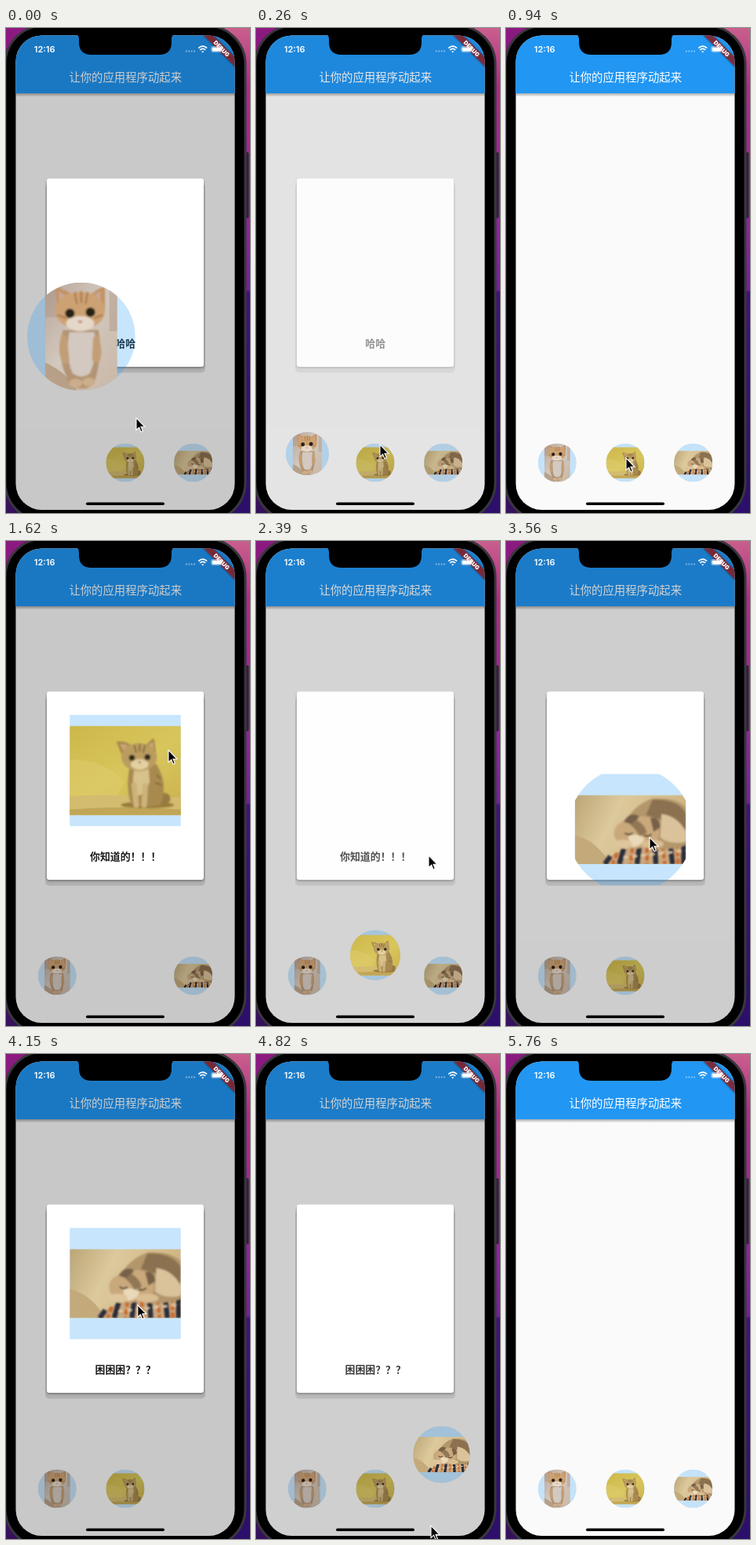
Animation, 311 px wide and 617 px high, one loop 5.86 s. Source, as an HTML page:

```html
<!DOCTYPE html>
<html lang="zh-CN">
<head>
<meta charset="utf-8">
<title>让你的应用程序动起来</title>
<style>
  html, body { margin: 0; width: 100%; height: 100%; overflow: hidden; background: #000; }
  svg { display: block; }
  text { font-family: "Noto Sans CJK SC", "Noto Sans CJK", sans-serif; }
  .latin { font-family: Inter, sans-serif; fill: #fff; }
</style>
</head>
<body>
<svg width="311" height="617" viewBox="0 0 311 617">
  <defs>
    <linearGradient id="wallRight" x2="0" y2="1">
      <stop offset="0" stop-color="#c85f8c"/><stop offset=".12" stop-color="#ae2d86"/>
      <stop offset=".4" stop-color="#8f279a"/><stop offset=".54" stop-color="#74219a"/>
      <stop offset=".545" stop-color="#42127c"/><stop offset="1" stop-color="#2b0f6a"/>
    </linearGradient>
    <linearGradient id="wallLeft" x2="0" y2="1">
      <stop offset="0" stop-color="#8c1a80"/><stop offset="1" stop-color="#35115c"/>
    </linearGradient>
    <linearGradient id="barShadow" x2="0" y2="1">
      <stop offset="0" stop-opacity=".32"/><stop offset="1" stop-opacity=".04"/>
    </linearGradient>
    <linearGradient id="wall" x2="1" y2="1">
      <stop offset="0" stop-color="#b7a397"/><stop offset=".45" stop-color="#d2c8be"/><stop offset="1" stop-color="#c9b7a6"/>
    </linearGradient>
    <linearGradient id="studio" x2=".8" y2="1">
      <stop offset="0" stop-color="#cdb74a"/><stop offset=".55" stop-color="#d8c65c"/><stop offset="1" stop-color="#cdb452"/>
    </linearGradient>
    <linearGradient id="room" x2="1" y2=".3">
      <stop offset="0" stop-color="#bba576"/><stop offset=".4" stop-color="#dcc99c"/><stop offset="1" stop-color="#cfb480"/>
    </linearGradient>
    <clipPath id="screenClip"><rect x="12.500" y="9.500" width="279" height="603.500" rx="33"/></clipPath>
    <clipPath id="roomClip"><rect x="-50" y="-31" width="100" height="62"/></clipPath>
    <filter id="soft" x="-20%" y="-50%" width="140%" height="200%"><feGaussianBlur stdDeviation="1.2"/></filter>
    <filter id="photoSoft"><feGaussianBlur stdDeviation=".6"/></filter>

    <!-- Photos live in a 100-unit square centred on the origin -->
    <g id="photo0">
      <rect x="-33.3" y="-50" width="66.6" height="100" fill="url(#wall)"/>
      <path d="M-33.3-50h15v32h-15zM26-50h7.3v45H26z" fill="#a8917f" opacity=".4"/>
      <path d="M-33.3 24Q-12 34-4 50h-29.3z" fill="#b8a088"/>
      <g filter="url(#photoSoft)">
        <path d="M-17-6Q-22 20-14 36-12 48-2 48 8 49 12 43 20 18 16-6z" fill="#b39473"/>
        <path d="M-11-4Q-15 18-8 34 0 40 8 34 16 16 12-4z" fill="#d3c9c0"/>
        <path d="M-18-3Q-23 13-17 25-12 27-11 22L-13 1zM15-2Q21 12 17 23 12 26 10 21L11 1z" fill="#c39d75"/>
        <path d="M-22-25L-24-45Q-15-44-9-39 0-42 9-39 16-45 22-46L22-23z" fill="#c39364"/>
        <path d="M-20-30L-21-41Q-16-40-12-36zM18-31L18-42Q14-41 10-36z" fill="#c9a594"/>
        <ellipse cx="-1" cy="-24" rx="23" ry="17.5" fill="#cda273"/>
        <path d="M-6-41l2 11M0-42v11M6-41l-2 11M-22-20l8 3M20-20l-8 3" stroke="#aa7b4b" stroke-width="1.6"/>
        <ellipse cx="-1" cy="-12" rx="13" ry="7" fill="#e5d8c9"/>
        <circle cx="-10.5" cy="-21.5" r="4.4" fill="#272019"/><circle cx="8.5" cy="-22.5" r="4.4" fill="#272019"/>
        <path d="M-3.5-14.500h5L-1-12z" fill="#b8766b"/>
        <ellipse cx="-5" cy="43" rx="6" ry="4" fill="#ccae8d"/><ellipse cx="7" cy="42" rx="6" ry="4" fill="#ccae8d"/>
      </g>
    </g>

    <g id="photo1">
      <rect x="-50" y="-40" width="100" height="80" fill="url(#studio)"/>
      <path d="M-50-10Q-20-10 0 10L-10 28H-50z" fill="#dfcd70" opacity=".5"/>
      <path d="M-50 23Q0 21 50 24V40H-50z" fill="#d3bb70"/>
      <path d="M-50 35Q0 31 50 35V40H-50z" fill="#c2a657"/>
      <g filter="url(#photoSoft)">
        <ellipse cx="20" cy="31" rx="24" ry="3" fill="#977a3a"/>
        <path d="M30 20Q43 19 40 28 34 33 28 30z" fill="#987a40"/>
        <path d="M4-4Q0 18 6 31 19 34 32 31 39 12 28-6z" fill="#a88a50"/>
        <path d="M8 0Q5 12 10 23 18 22 22 10L21-2z" fill="#d8c28c"/>
        <path d="M-3-14L-8-26Q1-27 6-22 13-25 19-23 23-28 26-29L28-14z" fill="#a78848"/>
        <path d="M-2-18L-5-24Q1-24 4-21zM26-18L25-26Q22-25 20-21z" fill="#c9a476"/>
        <ellipse cx="12.5" cy="-12" rx="16" ry="12.5" fill="#ba9c60"/>
        <path d="M8-23l2 7M13-24v7M18-23l-2 7M28 4l4 3M27 11l6 2" stroke="#84672f" stroke-width="1.3"/>
        <ellipse cx="13" cy="-5.5" rx="8" ry="4.8" fill="#e2d0a2"/>
        <circle cx="6" cy="-11.5" r="2.7" fill="#32291a"/><circle cx="20" cy="-12" r="2.7" fill="#32291a"/>
        <path d="M11.500-8h3L13-6z" fill="#a0624c"/>
        <path d="M8 13l2 18M18 14l-1 17" stroke="#cdb37a" stroke-width="5" stroke-linecap="round"/>
      </g>
    </g>

    <g id="photo2" clip-path="url(#roomClip)">
      <rect x="-50" y="-31" width="100" height="62" fill="url(#room)"/>
      <path d="M-50 5Q-30 10-18 31H-50z" fill="#c4aa7b"/>
      <path d="M-28 31Q-10 16 10 15L50 8V31z" fill="#c9a981"/>
      <g filter="url(#photoSoft)">
        <path d="M-18 24l-5 7M-6 17l-4 14M8 16l-2 15M22 15l1 16M36 13l2 18M48 10v21" stroke="#292d3b" stroke-width="4.5"/>
        <path d="M-12 21l-4 10M2 16l-2 15M15 16v15M29 14l2 17M42 12l1 19" stroke="#c96a2e" stroke-width="3.2" stroke-dasharray="5 2"/>
        <path d="M-6 25L50 19" stroke="#ecd7b5" stroke-width="1.4" stroke-dasharray="4 4"/>
        <path d="M-5-6Q3-22 20-28 42-29 50-20V14Q30 20 13 16z" fill="#b3966b"/>
        <path d="M20-27Q42-28 50-15V0Q33-8 14-13z" fill="#8b7150"/>
        <path d="M28-14Q43-12 50 2V11Q35 14 27 7z" fill="#dac39b"/>
        <path d="M-14 7Q-17-3-6-8 1-17 8-12 19-13 24-5 29 6 21 13 4 20-9 15z" fill="#c9a97c"/>
        <path d="M-6-7Q0-17 8-12L3-4zM18-10Q26-13 27-2L21 2z" fill="#776048"/>
        <path d="M5-9Q13-5 15 3L8 6Q5-1 0-4z" fill="#927757"/>
        <path d="M-2 6Q5 2 13 8 9 17 0 15z" fill="#ead9b8"/>
        <path d="M-5 3q4 3 7 0M12 5q4 2 7-1" fill="none" stroke="#3e3023" stroke-width="1.3"/>
        <ellipse cx="-7" cy="13" rx="9" ry="4" fill="#dec59c"/><ellipse cx="20" cy="13" rx="10" ry="4" fill="#d9be92"/>
      </g>
    </g>
  </defs>

  <rect width="160" height="617" fill="url(#wallLeft)"/>
  <rect x="160" width="151" height="617" fill="url(#wallRight)"/>
  <rect x="305" y="158" width="4.5" height="84" rx="2" fill="#2c2435"/>
  <rect x="-1" y="-3" width="306" height="630" rx="49" fill="#000" stroke="#39373d" stroke-width="3"/>

  <g clip-path="url(#screenClip)">
    <rect x="12" y="9" width="280" height="604" fill="#fafafa"/>
    <rect x="12" y="83" width="280" height="4" fill="url(#barShadow)"/>
    <rect x="12" y="9" width="280" height="74" fill="#2196f3"/>
    <text x="152.2" y="68" font-size="14.36" text-anchor="middle" fill="#fff">让你的应用程序动起来</text>
    <g id="thumbs"></g>
    <g id="page">
      <rect x="12" y="9" width="280" height="604" fill-opacity=".2"/>
      <rect x="50" y="198" width="204" height="240.500" rx="5" fill-opacity=".12"/>
      <rect x="51.500" y="193" width="201" height="240" rx="4" fill-opacity=".28" filter="url(#soft)"/>
      <rect x="52" y="191.500" width="200" height="239.500" rx="3" fill="#fff"/>
      <text id="caption" x="152.2" y="406" font-size="12.92" font-weight="700" text-anchor="middle" fill="#1c1c1c"></text>
    </g>
    <g id="flight"></g>
    <g transform="translate(292 9) rotate(45)">
      <rect x="-30" y="20.1" width="60" height="8.6" fill-opacity=".5" filter="url(#soft)"/>
      <rect x="-30" y="20.1" width="60" height="8.6" fill="#b71c1c" fill-opacity=".63"/>
      <text class="latin" y="27" font-size="7.3" font-weight="900" text-anchor="middle">DEBUG</text>
    </g>
    <text class="latin" x="35.8" y="31" font-size="11" font-weight="600">12:16</text>
    <path d="M229 29.500h12" stroke="#fff" stroke-opacity=".45" stroke-width="1.8" stroke-dasharray="1.8 1.6"/>
    <g fill="none" stroke="#fff" stroke-width="1.7">
      <path d="M245.300 25.600Q250.700 20.800 256.100 25.600M247.200 27.800Q250.700 24.800 254.200 27.800"/>
      <path d="M249 29.400h3.400L250.700 31.400z" fill="#fff" stroke="none"/>
    </g>
    <rect x="261.500" y="23.500" width="14.500" height="7.2" rx="2.2" fill="none" stroke="#fff" stroke-opacity=".5" stroke-width=".8"/>
    <rect x="262.600" y="24.500" width="12.300" height="5.2" rx="1.3" fill="#fff"/>
    <rect x="102" y="603.500" width="100" height="3.6" rx="1.8"/>
  </g>
  <path d="M89 8Q93 9 93 14V18Q93 34 109 34H195Q211 34 211 18V14Q211 9 215 8z"/>
  <path id="cursor" d="M0 0V15.500L3.600 12.200 6 17.800 8.400 16.800 6 11.300H11z" stroke="#fff" stroke-width="1.1"/>
</svg>

<script>
const LOOP = 5860, FLIGHT = 600;
const SMALL = 24.5, LARGE = 100, PHOTO = LARGE * Math.SQRT2;
const CARD = [152, 292];
const HOMES = [[65.3, 553], [152, 553], [238.6, 553]];
const VISITS = [
  { pet: 0, open: -2000, close: -190, caption: '哈哈' },
  { pet: 1, open: 1000, close: 2010, caption: '你知道的！！！' },
  { pet: 2, open: 3280, close: 4482, caption: '困困困？？？' }
];
// Cursor keys: time, x, y
const CURSOR = [
  [0, 166, 496], [260, 158, 530], [560, 153, 547], [1240, 153, 547], [1410, 178, 410],
  [1620, 207, 266], [2180, 207, 267], [2390, 220, 400], [2690, 241, 562], [2780, 243, 570],
  [3285, 243, 570], [3560, 183, 377], [3920, 166, 322], [4380, 170, 316],
  [4610, 224, 588], [4820, 223, 600], [4940, 222, 609], [5050, 222, 640]
];

const spread = (from, to, count) =>
  Array.from({ length: count }, (_, i) => from + (to - from) * i / (count - 1));
const TICKS = [
  0, 80, 260, 410, 560, 940, 1030, 1135, 1240, 1410, 1620, ...spread(1680, 1760, 4),
  2000, 2090, 2180, 2390, 2690, 2780, ...spread(2900, 3230, 9), 3320, 3410, 3560, 3680,
  ...spread(3920, 4380, 12), 4610, 4820, 4940, 5050, 5260, 5760
];

const $ = id => document.getElementById(id);
const clamp = v => Math.min(1, Math.max(0, v));
const mix = (a, b, k) => a + (b - a) * k;

// cubic-bezier(.4, 0, .2, 1)
function ease(x) {
  if (x <= 0 || x >= 1) return clamp(x);
  let lo = 0, hi = 1;
  for (let i = 0; i < 24; i++) {
    const s = (lo + hi) / 2, r = 1 - s;
    if (1.2 * r * r * s + .6 * r * s * s + s ** 3 < x) lo = s; else hi = s;
  }
  return 3 * (1 - lo) * lo * lo + lo ** 3;
}

// Circular arc that arrives at the end point moving vertically
function arc([ax, ay], [bx, by], k) {
  const dx = bx - ax, dy = by - ay;
  if (Math.abs(dx) < 2) return [mix(ax, bx, k), mix(ay, by, k)];
  const dist = Math.hypot(dx, dy), radius = dist * dist / Math.abs(dx) / 2;
  const angle = 2 * Math.asin(dist / (2 * radius)) * (1 - k);
  return [
    bx - Math.sign(dx) * radius * (1 - Math.cos(angle)),
    by - Math.sign(dy) * radius * Math.sin(angle)
  ];
}

function makeBubble(parent, id, pet) {
  parent.insertAdjacentHTML('beforeend', `
    <g><clipPath id="${id}"><circle/></clipPath>
      <g clip-path="url(#${id})">
        <g class="body"><rect x="-50" y="-50" width="100" height="100" fill="#2196f3" fill-opacity=".25"/>
          <use href="#photo${pet}"/></g>
      </g></g>`);
  const root = parent.lastElementChild;
  const circle = root.querySelector('circle'), body = root.querySelector('.body');
  return {
    show: on => root.setAttribute('visibility', on ? 'visible' : 'hidden'),
    place([x, y], radius) {
      root.setAttribute('transform', `translate(${x} ${y})`);
      circle.setAttribute('r', radius);
      body.setAttribute('transform', `scale(${Math.min(radius * 2, PHOTO) / 100})`);
    }
  };
}

const thumbs = HOMES.map((home, i) => {
  const bubble = makeBubble($('thumbs'), 'thumb' + i, i);
  bubble.place(home, SMALL);
  return bubble;
});
const heroes = HOMES.map((_, i) => makeBubble($('flight'), 'hero' + i, i));

function moveCursor(t) {
  const next = CURSOR.findIndex(key => key[0] > t);
  const b = CURSOR[next < 0 ? CURSOR.length - 1 : next];
  const a = next < 0 ? b : CURSOR[next - 1];
  const k = a === b ? 0 : (t - a[0]) / (b[0] - a[0]);
  $('cursor').setAttribute('transform', `translate(${mix(a[1], b[1], k)} ${mix(a[2], b[2], k)})`);
}

function render(t) {
  const visit = VISITS.find(v => t >= v.open && t < v.close + FLIGHT);
  thumbs.forEach((b, i) => b.show(!visit || visit.pet !== i));
  heroes.forEach((b, i) => b.show(visit && visit.pet === i));
  let opacity = 0;
  if (visit) {
    const closing = t >= visit.close;
    const p = clamp((t - (closing ? visit.close : visit.open)) / FLIGHT);
    const k = ease(p), home = HOMES[visit.pet];
    heroes[visit.pet].place(
      closing ? arc(CARD, home, k) : arc(home, CARD, k),
      closing ? mix(LARGE, SMALL, k) : mix(SMALL, LARGE, k)
    );
    opacity = ease((closing ? 1 - p : p) / .75);
    $('caption').textContent = visit.caption;
  }
  $('page').setAttribute('opacity', opacity);
  moveCursor(t);
}

const start = performance.now();
function frame() {
  const t = Math.max(0, performance.now() - start) % LOOP;
  render(TICKS.findLast(tick => tick <= t));
  requestAnimationFrame(frame);
}
frame();
</script>
</body>
</html>
```
